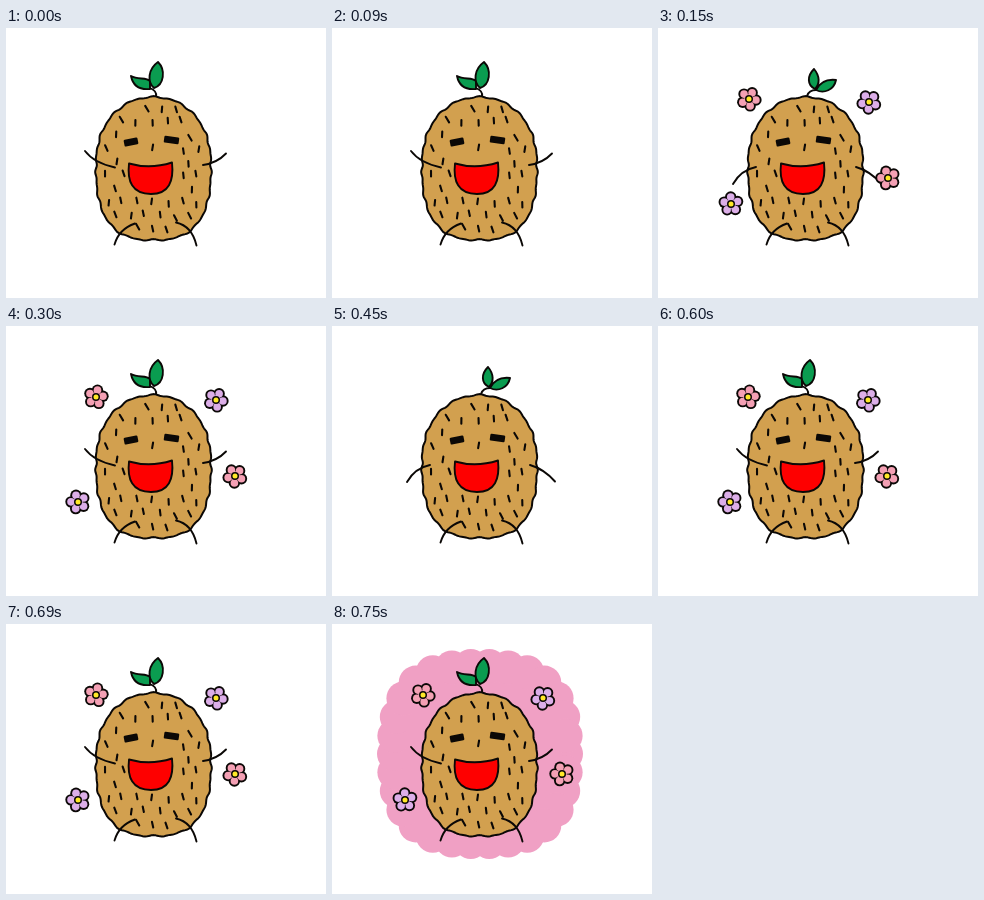
Recreate the animation shown at these times as an HTML page with a canvas. Size 320 px wide and 270 px high, loop 0.9 s.

```html
<!DOCTYPE html>
<html lang="en">
<head>
<meta charset="utf-8">
<title>Happy potato</title>
<style>
html, body { margin: 0; width: 100%; height: 100%; overflow: hidden; background: #fff; }
canvas { display: block; width: 320px; height: 270px; }
</style>
</head>
<body>
<canvas id="stage" width="320" height="270"></canvas>
<script>
const ctx = document.getElementById('stage').getContext('2d');
const INK = '#0b0806', SKIN = '#d2a04f', GREEN = '#0a9c50';
const PINK = '#f4a0b4', LILAC = '#dcaee8', CLOUD = '#f0a0c4';
const STEP = 150, TAU = Math.PI * 2;

const poses = [
  { up: true },
  { up: false, flowers: 'wide' },
  { up: true, flowers: 'near' },
  { up: false },
  { up: true, flowers: 'near' },
  { up: true, flowers: 'wide', cloud: true }
];

const flowers = [[91, 71, PINK], [211, 74, LILAC], [230, 150, PINK], [73, 176, LILAC]];
const sway = { wide: { dx: 0, turn: 0.15 }, near: { dx: -1, turn: -0.1 } };

function randomizer(seed) {
  return () => (seed = (seed * 16807) % 2147483647) / 2147483647;
}

// Distance from the centre to the edge of a superellipse at an angle
function reach(a, rx, ry, n) {
  return (Math.abs(Math.cos(a) / rx) ** n + Math.abs(Math.sin(a) / ry) ** n) ** (-1 / n);
}

// Potato edge: squarer towards the bottom, with a hand-drawn ripple
function potatoReach(a) {
  const ripple = 0.5 * Math.sin(19 * a) + 0.4 * Math.sin(31 * a);
  return reach(a, 57.5, 71.5, 2.4 + 0.25 * Math.sin(a)) + ripple;
}

const CX = 147.5, CY = 140.5;

function potatoOutline() {
  const path = new Path2D();
  for (let a = 0; a < TAU; a += 0.02) {
    const r = potatoReach(a);
    path.lineTo(CX + r * Math.cos(a), CY + r * Math.sin(a));
  }
  path.closePath();
  return path;
}

function onFace(x, y) {
  const eyes = Math.abs(y - 113) < 9 && Math.abs(Math.abs(x - 145.5) - 20) < 12;
  const mouth = Math.abs(x - 144.5) < 26 && y > 126 && y < 172;
  return eyes || mouth;
}

// Short marks on a loose staggered grid
function speckMarks() {
  const rand = randomizer(77), path = new Path2D();
  for (let row = 0; row < 10; row++) {
    for (let col = 0; col < 8; col++) {
      const x = 92 + col * 15 + (row % 2) * 7 + rand() * 4;
      const y = 78 + row * 13.4 + rand() * 5;
      const dx = rand() * 2.2 - 0.5;
      const r = Math.hypot(x - CX, y - CY);
      if (r > potatoReach(Math.atan2(y - CY, x - CX)) - 7 || onFace(x, y)) continue;
      path.moveTo(x - dx, y - 2.8);
      path.lineTo(x + dx, y + 2.8);
    }
  }
  return path;
}

const skin = potatoOutline();
const specks = speckMarks();

function shape(path, fill, width = 1.9) {
  const p = typeof path === 'string' ? new Path2D(path) : path;
  if (fill) {
    ctx.fillStyle = fill;
    ctx.fill(p);
  }
  ctx.lineWidth = width;
  ctx.strokeStyle = INK;
  ctx.stroke(p);
}

function disc(x, y, r, fill) {
  ctx.beginPath();
  ctx.arc(x, y, r, 0, TAU);
  ctx.fillStyle = fill;
  ctx.fill();
}

function drawCloud() {
  const bumps = 30;
  disc(148, 130, 88, CLOUD);
  for (let i = 0; i < bumps; i++) {
    const a = i / bumps * TAU;
    const r = reach(a, 86, 88, 2.8);
    disc(148 + r * Math.cos(a), 130 + r * Math.sin(a), 17, CLOUD);
  }
}

function flower(x, y, color, turn) {
  const petals = (r, fill) => {
    for (let i = 0; i < 5; i++) {
      const a = turn + i * TAU / 5;
      disc(x + 7 * Math.cos(a), y + 7 * Math.sin(a), r, fill);
    }
  };
  petals(5.7, INK);
  petals(3.8, color);
  disc(x, y, 4.8, color);
  disc(x, y, 4, INK);
  disc(x, y, 2.5, '#ffe928');
}

function sprout(up) {
  if (up) {
    shape('M150 68Q151 63 144 60');
    shape('M125 48C132 52 140 49 144 53L144 61C134 62 127 58 125 48Z', GREEN);
    shape('M152 34C160 42 158 57 148 60C141 54 142 41 152 34Z', GREEN);
  } else {
    shape('M149 68Q151 62 158 62');
    shape('M156 41C162 48 162 56 157 61C149 57 149 48 156 41Z', GREEN);
    shape('M178 52C176 62 166 66 158 62C162 54 169 51 178 52Z', GREEN);
  }
}

function eye(x, y, w, tilt) {
  ctx.save();
  ctx.translate(x, y);
  ctx.rotate(tilt);
  ctx.fillStyle = INK;
  ctx.beginPath();
  ctx.roundRect(-w / 2, -3.5, w, 7, 1.2);
  ctx.fill();
  ctx.restore();
}

function potato() {
  shape(skin, SKIN, 2);
  shape(specks, null, 2.1);
  eye(125, 114, 14, -0.2);
  eye(165.5, 112, 15, 0.14);
  shape('M123 135.5Q144 141.5 166 134.5C168 153 163 166 145 166C126 166 121 153 123 135.5Z', '#fe0000');
}

function limbs(up) {
  shape(up ? 'M79 123Q88 135 109 139.5' : 'M75 156Q83 142 98 139');
  shape(up ? 'M197 137Q211 135 220 125.5' : 'M198 139Q212 143 223 155.5');
  shape('M108.5 216.5Q113 201 129 195.5');
  shape('M170 194.5Q186 198 190.5 217.5');
}

function draw(pose) {
  ctx.fillStyle = '#fff';
  ctx.fillRect(0, 0, 320, 270);
  ctx.lineCap = ctx.lineJoin = 'round';
  if (pose.cloud) drawCloud();
  sprout(pose.up);
  potato();
  limbs(pose.up);
  if (pose.flowers) {
    const { dx, turn } = sway[pose.flowers];
    flowers.forEach(([x, y, color], i) => flower(x + dx, y, color, turn + i * 0.25));
  }
}

function tick(now) {
  draw(poses[Math.floor(now / STEP) % poses.length]);
  requestAnimationFrame(tick);
}

tick(performance.now());
</script>
</body>
</html>
```
